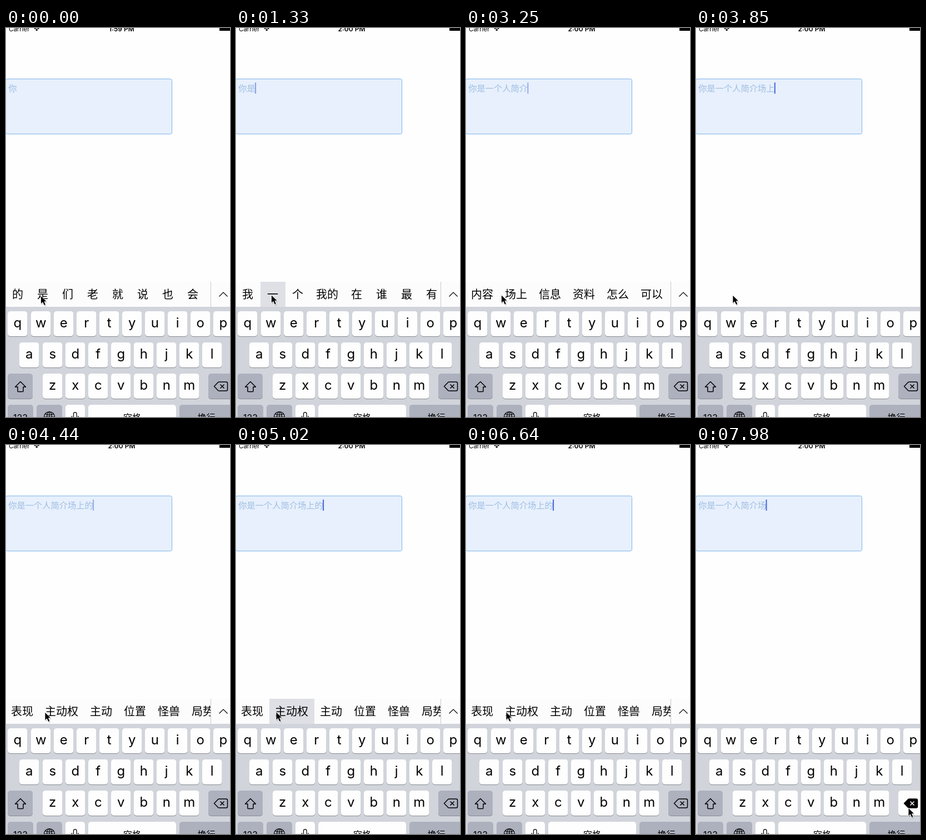
Recreate the animation shown at these times as an HTML page. Size 403 px wide and 699 px high, loop 8 s.

```html
<!DOCTYPE html>
<html lang="zh-CN">
<head>
<meta charset="utf-8">
<style>
  html, body { margin: 0; width: 100%; height: 100%; overflow: hidden; background: #fefefe; }
  svg { display: block; width: 403px; height: 699px; }
  text { font-family: Inter, "Noto Sans CJK SC", "Noto Sans CJK", sans-serif; fill: #000; }
  .mid { text-anchor: middle; }
  .han { font-family: "Noto Sans CJK SC", "Noto Sans CJK", sans-serif; font-weight: 300; }
  .line { fill: none; stroke: #000; stroke-width: 1.5; stroke-linejoin: round; }
</style>
</head>
<body>
<svg id="stage" viewBox="0 0 403 699">
  <rect width="403" height="699" fill="#fefefe"/>
  <text x="5" y="6" font-size="11.500">Carrier</text>
  <path class="line" d="M51 1.500Q55.200 -2 59.500 1.500"/>
  <path d="M52.800 3Q55.200 1 57.700 3L55.200 5.500Z"/>
  <text id="clock" class="mid" x="208" y="6" font-size="12" font-weight="600"></text>
  <rect x="384" y="0" width="19" height="5"/>

  <rect x="-.5" y="91.500" width="299" height="99" rx="3" fill="#e7f0fc" stroke="#7fb5e8"/>
  <text id="typed" class="han" x="4.200" y="113.500" font-size="15.250" style="fill:#a0bee3"></text>
  <rect id="caret" y="98" width="2" height="20" fill="#4468dc"/>

  <g id="bar">
    <rect y="456" width="403" height="45" fill="#fcfcfc"/>
    <rect id="mark" y="456" height="45" fill="#dfe0e6"/>
    <g id="words"></g>
    <rect x="369" y="456" width="34" height="45" fill="#fcfcfc"/>
    <path d="M368.500 456V501" stroke="#c9cacf"/>
    <path class="line" d="M383.500 482.500L391 475L398.500 482.500" style="stroke-width:1.2;stroke-linejoin:miter"/>
  </g>

  <rect y="501" width="403" height="198" fill="#d1d4db"/>
  <g id="keys"></g>
  <path class="line" d="M26 635.500L35.500 645H31V652.500Q31 653.500 30 653.500H22Q21 653.500 21 652.500V645H16.500Z"/>
  <g id="erase">
    <path id="tag" class="line" d="M374.500 644L381.500 636.800Q382.200 636 383.500 636H396Q398.500 636 398.500 638.500V649.500Q398.500 652 396 652H383.500Q382.200 652 381.500 651.200Z"/>
    <path id="cross" class="line" d="M385.500 640.500L392.500 647.500M392.500 640.500L385.500 647.500"/>
  </g>
  <g class="line" style="stroke-width:1.2">
    <circle cx="78" cy="699" r="9.500"/>
    <ellipse cx="78" cy="699" rx="4.500" ry="9.500"/>
    <path d="M78 689.500V699M70.500 693.500Q78 697 85.500 693.500M68.500 699H87.500"/>
    <path d="M121.500 699V693.500A2.800 2.800 0 0 1 127.100 693.500V699M118.500 697V699M130 697V699"/>
  </g>
  <g id="pointer">
    <path d="M1 2V17L4.500 14L7 19.500L10 18L7.500 13H12Z" fill="#000" opacity=".18"/>
    <path d="M0 0V15L3.500 11.800L6 17.500L9 16.200L6.500 10.700H11Z" fill="#000" stroke="#fff" stroke-width=".9"/>
  </g>
</svg>
<script>
const LOOP = 8000, STEP = 147.8;
const el = id => document.getElementById(id);
const set = (node, attrs) => { for (const k in attrs) node.setAttribute(k, attrs[k]); return node; };
const add = (parent, tag, attrs, text) => {
  const node = set(document.createElementNS('http://www.w3.org/2000/svg', tag), attrs);
  if (text) node.textContent = text;
  return parent.appendChild(node);
};

// Keyboard
function key(x, y, w, label, { dark = false, size = 24, base = 29, cls = 'mid' } = {}) {
  add(el('keys'), 'rect', { x, y: y + 1, width: w, height: 45, rx: 5, fill: '#898b91' });
  const face = add(el('keys'), 'rect', { x, y, width: w, height: 45, rx: 5, fill: dark ? '#adb1be' : '#fefefe' });
  if (label) add(el('keys'), 'text', { x: x + w / 2, y: y + base, 'font-size': size, class: cls }, label);
  return face;
}
['qwertyuiop', 'asdfghjkl', 'zxcvbnm'].forEach((row, r) =>
  [...row].forEach((c, i) => key(Math.round([3.45, 24.45, 65.55][r] + i * 41.1), 509 + r * 56, 35.5, c)));
const small = { size: 16, base: 28.5 };
key(3, 621, 45, '', { dark: true });
const eraseKey = key(364, 621, 45, '', { dark: true });
key(3, 677, 46, '123', { ...small, dark: true });
key(55, 677, 46, '', { dark: true });
key(107, 677, 35, '');
key(148, 677, 158, '空格', { ...small, cls: 'mid han' });
key(312, 677, 97, '换行', { ...small, dark: true, cls: 'mid han' });

// Each entry takes effect at its step and holds until the next one.
const typed = [[0, '你'], [2, '你是'], [10, '你是一'], [18, '你是一个人'], [21, '你是一个人简介'],
  [26, '你是一个人简介场上'], [29, '你是一个人简介场上的'], [52, '你是一个人简介场上'], [54, '你是一个人简介场']];
const onField = '比分 的 表现 位置 比赛 球员 形势';
const choices = [[0, '的 是 们 老 就 说 也 会'], [2, ''], [3, '我 一 个 我的 在 谁 最 有'], [10, ''],
  [11, '个 个人 种 直 些 样 下 次'], [18, ''], [19, '生活 简介 都是 信息 资料 喜欢'], [21, ''],
  [22, '内容 场上 信息 资料 怎么 可以'], [26, ''], [27, onField], [29, ''],
  [30, '表现 主动权 主动 位置 怪兽 局势'], [52, onField], [54, '']];
const marked = [[0, -1], [1, 1], [2, -1], [9, 1], [10, -1], [17, 1], [18, -1], [20, 1], [21, -1],
  [25, 1], [26, -1], [28, 1], [29, -1], [33, 1], [36, 0], [37, 1], [43, -1]];
const pointer = [[0, [62.5, 481]], [5, [63.5, 479.5]], [24, [66, 480]], [28, [70, 480]], [32, [72, 479.5]],
  [35, [62, 479.5]], [36, [54, 479.5]], [37, [72, 479.5]], [46, [104, 500]], [47, [250, 588]],
  [48, [371, 652]], [49, [382, 652]]];
const at = (track, n) => track.findLast(([start]) => start <= n)[1];

function caretOpacity(n) {
  if (n >= 50) return 1;
  const phase = (n + 7) % 8;
  if (phase === 0) return n ? .6 : 0;
  if (n === 0) return 0;
  if (phase < 5) return 1;
  return phase === 5 && n > 6 ? .5 : 0;
}

function drawChoices(list, chosen) {
  el('bar').style.display = list ? '' : 'none';
  el('words').replaceChildren();
  set(el('mark'), { width: 0 });
  let x = -1;
  list.split(' ').forEach((word, i) => {
    const w = Math.max(45, word.length * 20 + 21);
    if (i === chosen) set(el('mark'), { x, width: w });
    add(el('words'), 'text', { x: x + w / 2 - .5, y: 486, 'font-size': 20, class: 'mid han' }, word);
    x += w;
  });
}

let shown = -1;
function render(t) {
  const n = Math.floor((t + 12) / STEP);
  if (n === shown) return;
  shown = n;
  const text = at(typed, n), pressed = n >= 50;
  el('clock').textContent = n < 4 ? '1:59 PM' : '2:00 PM';
  el('typed').textContent = text;
  set(el('caret'), { x: 3.6 + text.length * 15.25, opacity: caretOpacity(n) });
  drawChoices(at(choices, n), at(marked, n));
  set(el('pointer'), { transform: `translate(${at(pointer, n)})` });
  set(eraseKey, { fill: pressed ? '#fefefe' : '#adb1be' });
  el('tag').style.fill = pressed ? '#000' : 'none';
  el('cross').style.stroke = pressed ? '#fff' : '#000';
}

const begin = performance.now();
function tick() {
  render((performance.now() - begin) % LOOP);
  requestAnimationFrame(tick);
}
tick();
</script>
</body>
</html>
```
